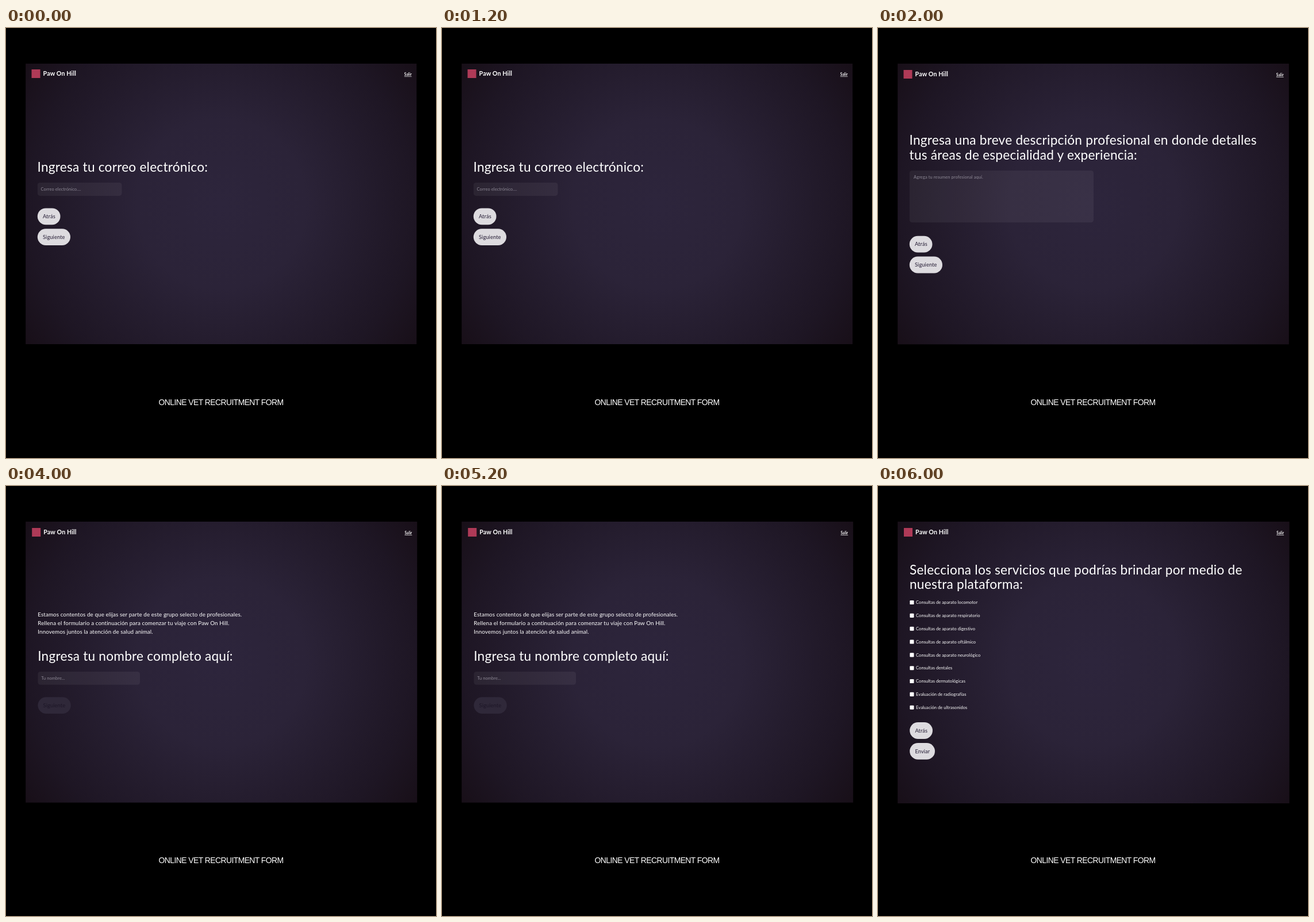
These frames come from a looping animation (748x748 px, 8000 ms). An HTML page:

```html
<!DOCTYPE html>
<html lang="es">
<head>
<meta charset="utf-8">
<title>Online vet recruitment form</title>
<style>
  html, body { margin: 0; width: 100%; height: 100%; overflow: hidden; background: #000; }
  svg { display: block; width: 100vw; height: 100vh; }
  text { font-family: Lato, "Open Sans", sans-serif; letter-spacing: .01em; fill: #fff; white-space: pre; }
  .screen { opacity: 0; }
  .brand { font-size: 10.7px; font-weight: 700; }
  .exit { font-size: 6.5px; font-weight: 700; text-decoration: underline; }
  .head { font-size: 22.65px; }
  .body { font-size: 9.8px; }
  .item { font-size: 7.5px; }
  .hint { font-size: 7.5px; fill: #8d8895; }
  .label { font-size: 9.3px; fill: #231b33; }
  .off { fill: #1d1627; }
  .caption { font-family: "Liberation Sans", Arial, sans-serif; font-size: 13.9px; letter-spacing: -.55px; }
</style>
</head>
<body>
<svg id="stage" viewBox="0 0 748 748">
  <defs>
    <radialGradient id="glow" gradientUnits="userSpaceOnUse" cx="374.5" cy="306.5" r="419">
      <stop offset="0" stop-color="#2d253c"/>
      <stop offset=".35" stop-color="#2b2338"/>
      <stop offset=".8" stop-color="#1e1624"/>
      <stop offset="1" stop-color="#180f18"/>
    </radialGradient>
  </defs>
  <rect width="748" height="748" fill="#000"/>
  <text class="caption" x="265.6" y="656">ONLINE VET RECRUITMENT FORM</text>
</svg>
<script>
const LOOP = 8000;
const BRAND = "Paw On Hill";
const stage = document.getElementById("stage");

function add(parent, tag, attrs, content) {
  const el = document.createElementNS("http://www.w3.org/2000/svg", tag);
  for (const key in attrs) el.setAttribute(key, attrs[key]);
  if (content) el.textContent = content;
  parent.appendChild(el);
  return el;
}

const box = (g, x, y, width, height, rx, fill) =>
  add(g, "rect", { x, y, width, height, rx, fill });

const text = (g, cls, x, y, content) =>
  add(g, "text", { class: cls, x, y }, content);

function button(g, x, y, width, label, off) {
  box(g, x, y, width, 28.8, 14.4, off ? "#2f2839" : "#dddbdf");
  text(g, off ? "label off" : "label", x + 9.2, y + 17.7, label);
}

function field(g, x, y, width, height, hint, dx, dy) {
  box(g, x, y, width, height, 4.5, "rgba(255,255,255,.055)");
  text(g, "hint", x + dx, y + dy, hint);
}

const screens = [
  {
    size: [680, 488], dx: 0, dy: 0,
    draw(g) {
      text(g, "head", 54.6, 249.6, "Ingresa tu correo electrónico:");
      field(g, 54.8, 268.9, 146.7, 23, "Correo electrónico....", 5.8, 14.3);
      button(g, 54.8, 313.4, 39.7, "Atrás");
      button(g, 54.8, 349.2, 57.2, "Siguiente");
    }
  },
  {
    size: [680.6, 488.3], dx: 0, dy: 1,
    draw(g) {
      text(g, "head", 54.6, 203.3, "Ingresa una breve descripción profesional en donde detalles");
      text(g, "head", 54.6, 228.6, "tus áreas de especialidad y experiencia:");
      field(g, 54.8, 248, 320.3, 90.3, "Agrega tu resumen profesional aquí.", 7.3, 14);
      button(g, 54.8, 361.7, 39.7, "Atrás");
      button(g, 54.8, 397.6, 57.2, "Siguiente");
    }
  },
  {
    size: [681, 488.7], dx: .7, dy: 1,
    draw(g) {
      text(g, "body", 55.3, 227.2, "Estamos contentos de que elijas ser parte de este grupo selecto de profesionales.");
      text(g, "body", 55.3, 242.2, `Rellena el formulario a continuación para comenzar tu viaje con ${BRAND}.`);
      text(g, "body", 55.3, 257.2, "Innovemos juntos la atención de salud animal.");
      text(g, "head", 55.2, 303.8, "Ingresa tu nombre completo aquí:");
      field(g, 55.4, 322.9, 177.7, 22.9, "Tu nombre...", 5.8, 14.3);
      button(g, 55.4, 367.2, 57.4, "Siguiente", true);
    }
  },
  {
    size: [681.4, 490], dx: .5, dy: 1,
    draw(g) {
      text(g, "head", 55, 153.8, "Selecciona los servicios que podrías brindar por medio de");
      text(g, "head", 55, 179, "nuestra plataforma:");
      [
        "Consultas de aparato locomotor",
        "Consultas de aparato respiratorio",
        "Consultas de aparato digestivo",
        "Consultas de aparato oftálmico",
        "Consultas de aparato neurológico",
        "Consultas dentales",
        "Consultas dermatológicas",
        "Evaluación de radiografías",
        "Evaluación de ultrasonidos"
      ].forEach((label, i) => {
        const y = 202.5 + i * 22.83;
        box(g, 55.4, y - 3.5, 7.1, 7.1, 1.2, "#fff");
        text(g, "item", 66.1, y + 2.7, label);
      });
      button(g, 55.2, 411.1, 39.8, "Atrás");
      button(g, 55.2, 447, 43.8, "Enviar");
    }
  }
];

screens.forEach(({ size, dx, dy, draw }, i) => {
  const g = add(stage, "g", { class: "screen" });
  box(g, 34.2, 62, size[0], size[1], 0, "url(#glow)");
  box(g, 44.5 + dx, 72 + dy, 15, 15, 0, "#ae3a57");
  text(g, "brand", 64.6 + dx, 83.3 + dy, BRAND);
  text(g, "exit", 692.8 + dx, 83 + dy, "Salir");
  draw(g);

  const n = screens.length;
  const last = i === n - 1 ? 1 : 0;
  const steps = [
    { offset: 0, opacity: i ? 0 : 1 },
    { offset: i / n, opacity: 1 },
    { offset: (i + 1) / n, opacity: last },
    { offset: 1, opacity: last }
  ].map(step => ({ ...step, easing: "step-end" }));
  g.animate(steps, { duration: LOOP, iterations: Infinity });
});
</script>
</body>
</html>
```
